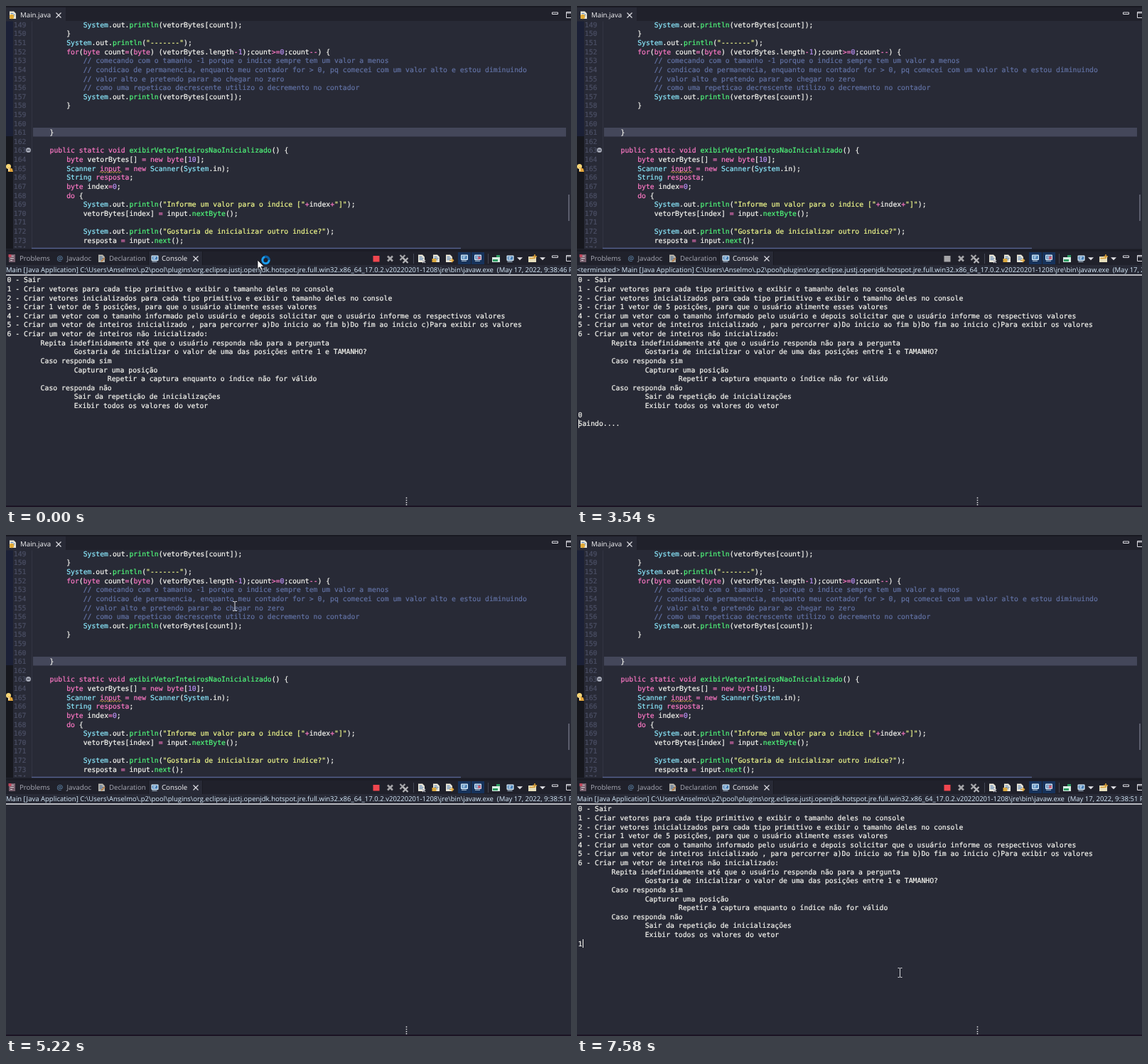
An HTML page that plays this animation: 795x704 px, repeating every 8 s.

```html
<!DOCTYPE html>
<html lang="pt">
<head>
<meta charset="utf-8">
<title>Console</title>
<style>
html, body { margin: 0; width: 100%; height: 100%; overflow: hidden; background: #282a36; }
svg { display: block; }
text { white-space: pre; text-rendering: geometricPrecision; }
.mono { --ink: #f8f8f2; font: 9.79px "DejaVu Sans Mono", monospace; }
.mono text, .mono tspan { fill: var(--ink); stroke: var(--ink); stroke-width: .2px; }
.ui { font: 9.7px "Open Sans", sans-serif; fill: #a9abb6; }
.path { font-size: 9.52px; fill: #d6eafa; }
</style>
</head>
<body>
<svg id="stage" width="795" height="704" viewBox="0 0 795 704">
  <defs>
    <clipPath id="editClip"><rect y="21.5" width="795" height="318"/></clipPath>
    <clipPath id="consClip"><rect y="379" width="795" height="323"/></clipPath>
    <g id="monitor">
      <rect x="-5" y="-4.5" width="10" height="7.5" rx="1" fill="#d8ecfa"/>
      <rect x="-3.7" y="-3.2" width="7.4" height="4.8" fill="#3f78b0"/>
      <path d="M-2.5-1.8h4M-2.5 0h3" stroke="#e8f4ff"/>
      <path d="M-4 4.3h7" stroke="#9fb4c8" stroke-width="1.3"/>
    </g>
    <g id="doc">
      <path d="M-5-5.500h6l3 3V5h-9z" fill="#e9e6d8"/>
      <path d="M-3.500-2.500h4M-3.500-.5h6M-3.500 1.500h5" stroke="#5580b5"/>
    </g>
    <path id="cross" d="M-3.500-3.500l7 7M3.500-3.500l-7 7"/>
    <path id="drop" d="M-4-1.800h8L0 2.200z" fill="#e4e4e8"/>
    <g id="winBtns" fill="none" stroke="#dcdce2">
      <path d="M768.500 9h8v2.500h-8z"/>
      <path d="M788.500 8.500h9v8h-9zM788.500 10h9"/>
    </g>
    <g id="arrow">
      <path d="M0 0V12.500L2.900 9.800L5 14.400L7.100 13.400L5.100 9.100H9z" fill="#fff" stroke="#15161c" stroke-width=".8"/>
    </g>
    <g id="busy">
      <use href="#arrow"/>
      <circle cx="11.500" r="4.700" fill="none" stroke="#0b62a8" stroke-width="3.400"/>
      <circle cx="11.500" r="4.700" fill="none" stroke="#1fa0ee" stroke-width="2.400" stroke-dasharray="20 9.500"/>
    </g>
    <path id="beam" d="M-3-6.500h2.300L0-5.800L.7-6.500H3M-3 6.500h2.300L0 5.800L.7 6.500H3M0-6V6" fill="none" stroke="#d5d5da"/>
  </defs>

  <rect width="795" height="704" fill="#282a36"/>

  <!-- editor -->
  <rect y="21" width="10" height="162" fill="#1b2036"/>
  <rect y="183" width="10" height="158" fill="#16171d"/>
  <path d="M36.500 21V340" stroke="#323543"/>
  <rect x="38" y="171" width="750" height="12.500" fill="#44475a"/>
  <g id="code" class="mono" clip-path="url(#editClip)"></g>
  <path d="M132 234l1.500-1.500l2 2l2-2l2 2l2-2l2 2l2-2l2 2l2-2l2 2l2-2l2 2l2-2l2 2l2-2l1 1" fill="none" stroke="#e8b04c" stroke-width=".9"/>
  <circle cx="31.500" cy="202.500" r="3.500" fill="#a4a8b5"/>
  <path d="M29.500 202.500h4" stroke="#343746"/>
  <circle cx="3.500" cy="225.500" r="3.500" fill="#f5d577"/>
  <path d="M3 227l6 1.500l1 4.500H3z" fill="#e3a53a"/>
  <path d="M4 228v4" stroke="#fff3c8" stroke-width="1.500"/>
  <path d="M792 265V302" stroke="#777b8c" stroke-width="1.300"/>
  <path d="M36 340.500H640" stroke="#56618f" stroke-width="1.300"/>
  <rect id="thumb" x="36" y="331" width="604" height="10" fill="#56618f"/>

  <!-- editor tab -->
  <rect width="795" height="21" fill="#20212b"/>
  <rect width="84" height="21.500" fill="#282a36"/>
  <rect width="795" height="2" fill="#191a22"/>
  <use href="#doc" x="10" y="13"/>
  <circle cx="8" cy="15" r="3.200" fill="#e2aa35"/>
  <text class="ui" x="20" y="16.300" style="fill:#f2f2f4">Main.java</text>
  <use href="#cross" x="74" y="13" stroke="#dedee4" stroke-width="1.200"/>
  <use href="#winBtns"/>

  <!-- view tabs -->
  <rect y="341.500" width="795" height="4" fill="#1b1c25"/>
  <rect y="345" width="795" height="19" fill="#20212b"/>
  <rect x="200" y="345" width="77" height="19" fill="#282a36"/>
  <path d="M200.500 345v19M276.500 345v19" stroke="#191a22"/>
  <rect x="4" y="349" width="9" height="11" fill="#77606e"/>
  <path d="M6 351.500h5M6 354.500h5M6 357.500h3" stroke="#d4c7ce"/>
  <rect x="3.500" y="349" width="4" height="4" fill="#c2475c"/>
  <text class="ui" x="19" y="358.400">Problems</text>
  <text class="ui" x="71.500" y="358" style="fill:#6d9cc6">@</text>
  <text class="ui" x="85.500" y="358.400">Javadoc</text>
  <use href="#doc" x="135" y="355" opacity=".75"/>
  <path d="M134 359l5-5" stroke="#b9814b" stroke-width="2"/>
  <text class="ui" x="145" y="358.400">Declaration</text>
  <use href="#monitor" x="209.500" y="355"/>
  <text class="ui" x="219" y="358.400" style="fill:#f6f6f8">Console</text>
  <use href="#cross" x="267" y="355" stroke="#dedee4" stroke-width="1.200"/>

  <!-- toolbar -->
  <rect id="stop" x="516.500" y="351" width="9" height="8.500"/>
  <use href="#cross" x="540.500" y="355" stroke="#a5a5a8" stroke-width="2.600"/>
  <use href="#cross" x="558" y="353.500" stroke="#a5a5a8" stroke-width="2.200"/>
  <use href="#cross" x="562" y="357.500" stroke="#b5b5b8" stroke-width="2.200"/>
  <path d="M573.500 348v14M678.500 348v14" stroke="#444754"/>
  <use href="#doc" x="585" y="355"/>
  <path d="M586 357l4 4m0-4l-4 4" stroke="#b9b9c0" stroke-width="1.300"/>
  <use href="#doc" x="606" y="355"/>
  <rect x="599.500" y="355" width="6" height="5" fill="#dda93d"/>
  <use href="#doc" x="624" y="355"/>
  <path d="M624 357.500h5m-2-2.500l2.500 2.500l-2.500 2.500" fill="none" stroke="#e0a63c" stroke-width="1.500"/>
  <path d="M636 346h18v17h-18zM655 346h18v17h-18z" fill="#17335c"/>
  <use href="#monitor" x="645" y="354"/>
  <use href="#monitor" x="664" y="354"/>
  <path d="M664 352l4 4m0-4l-4 4" stroke="#e14d5b" stroke-width="1.300"/>
  <path d="M684 353h6v-2h5v9h-11z" fill="#d9eee4"/>
  <path d="M685 356h7v3h-7zM690 350h5v3h-5z" fill="#2f9c63"/>
  <use href="#monitor" x="709.500" y="355"/>
  <use href="#drop" x="723" y="355"/>
  <rect x="735" y="352" width="11" height="8" fill="#e6dfbd"/>
  <path d="M736.500 354.500h7M744 349v6M741 352h6" stroke="#d99d34" stroke-width="1.600"/>
  <use href="#drop" x="755" y="355"/>
  <use href="#winBtns" y="342"/>

  <!-- console -->
  <text id="title" class="ui path" x="0" y="374.200"></text>
  <path d="M0 378H795" stroke="#e9e9ec" stroke-width="1.500"/>
  <g id="out" class="mono" clip-path="url(#consClip)"></g>
  <rect id="caret" width="1" height="12" fill="#f8f8f2"/>
  <rect y="702" width="795" height="2" fill="#1b1324"/>
  <path d="M563.500 690.500v12" stroke="#e4e4e8" stroke-width="1.500" stroke-dasharray="1.500 1.700"/>
  <text id="status" class="ui" x="567" y="699.600" style="fill:#c5c6cd">Launching Main: (0%)</text>
  <use id="mouse"/>
</svg>
<script>
const $ = id => document.getElementById(id);
const NS = 'http://www.w3.org/2000/svg';

function add(parent, tag, attrs, text) {
  const el = document.createElementNS(NS, tag);
  for (const k in attrs) el.setAttribute(k, attrs[k]);
  if (text) el.textContent = text;
  parent.append(el);
  return el;
}

// ---- editor ----
const source = `            System.out.println(vetorBytes[count]);
        }
        System.out.println("-------");
        for(byte count=(byte) (vetorBytes.length-1);count>=0;count--) {
            // comecando com o tamanho -1 porque o indice sempre tem um valor a menos
            // condicao de permanencia, enquanto meu contador for > 0, pq comecei com um valor alto e estou diminuindo
            // valor alto e pretendo parar ao chegar no zero
            // como uma repeticao decrescente utilizo o decremento no contador
            System.out.println(vetorBytes[count]);
        }


    }

    public static void exibirVetorInteirosNaoInicializado() {
        byte vetorBytes[] = new byte[10];
        Scanner input = new Scanner(System.in);
        String resposta;
        byte index=0;
        do {
            System.out.println("Informe um valor para o indice ["+index+"]");
            vetorBytes[index] = input.nextByte();

            System.out.println("Gostaria de inicializar outro indice?");
            resposta = input.next();
`.split('\n');

const rules = [
  [/^\/\/.*/, '#6272a4'],
  [/^"[^"]*"/, '#f1fa8c'],
  [/^(public|static|void|new|for|do|byte)\b/, '#ff79c6'],
  [/^(System|Scanner|String)\b/, '#8be9fd'],
  [/^(input(?= = new)|resposta(?=;))/, '#ff79c6'],
  [/^\w+(?=\()/, '#50fa7b'],
  [/^\d+\b/, '#bd93f9'],
  [/^[-=+>]+/, '#ff79c6'],
  [/^(\w+|\s+|.)/, '#f8f8f2']
];

source.forEach((line, i) => {
  const y = 29.8 + i * 12.62;
  add($('code'), 'text', { x: 28.500, y, 'text-anchor': 'end', style: '--ink:#4c5066' }, String(149 + i));
  const row = add($('code'), 'text', { x: 38, y });
  while (line) {
    const [re, ink] = rules.find(r => r[0].test(line));
    const word = line.match(re)[0];
    add(row, 'tspan', { style: '--ink:' + ink }, word);
    line = line.slice(word.length);
  }
});

// ---- console contents ----
const tab = n => ' '.repeat(8 * n);
const menu = [
  '0 - Sair',
  '1 - Criar vetores para cada tipo primitivo e exibir o tamanho deles no console',
  '2 - Criar vetores inicializados para cada tipo primitivo e exibir o tamanho deles no console',
  '3 - Criar 1 vetor de 5 posições, para que o usuário alimente esses valores',
  '4 - Criar um vetor com o tamanho informado pelo usuário e depois solicitar que o usuário informe os respectivos valores',
  '5 - Criar um vetor de inteiros inicializado , para percorrer a)Do inicio ao fim b)Do fim ao inicio c)Para exibir os valores',
  '6 - Criar um vetor de inteiros não inicializado:',
  tab(1) + 'Repita indefinidamente até que o usuário responda não para a pergunta',
  tab(2) + 'Gostaria de inicializar o valor de uma das posições entre 1 e TAMANHO?',
  tab(1) + 'Caso responda sim',
  tab(2) + 'Capturar uma posição',
  tab(3) + 'Repetir a captura enquanto o índice não for válido',
  tab(1) + 'Caso responda não',
  tab(2) + 'Sair da repetição de inicializações',
  tab(2) + 'Exibir todos os valores do vetor'
];
const values = [0, 57, 0, 76, 0, 0, 0, 100]
  .map((v, i) => `O valor no vetor na posicao ${i + 2} é ${v}`);

const app = 'Main [Java Application] C:\\Users\\Anselmo\\.p2\\pool\\plugins\\org.eclipse.justj.openjdk.hotspot.jre.full.win32.x86_64_17.0.2.v20220201-1208\\jre\\bin\\javaw.exe  (May 17, 2022, ';
const first = app + '9:38:46 PM)', older = app + '9:35:42 PM)', second = app + '9:38:51 PM)';

// time, title, lines, baseline of the first line
const screens = [
  [0, first, menu, 388.3],
  [1980, first, [...menu, '0'], 388.3],
  [2410, '<terminated> ' + first, [...menu, '0', 'Saindo....'], 388.3],
  [5080, older, [...values, ...menu], 386.2],
  [5220, second, [], 388.3],
  [5370, second, menu, 388.3],
  [7580, second, [...menu, '1'], 388.3]
];
const pages = screens.map(([, , lines, top]) => {
  const g = add($('out'), 'g', {});
  lines.forEach((s, i) => add(g, 'text', { x: 1.500, y: top + i * 12.63 }, s));
  return g;
});

// ---- timing ----
// time, shape, x, y
const mouse = [
  [0, 'busy', 354, 357],
  [150, 'beam', 341, 462],
  [270, 'beam', 331, 562],
  [420, 'beam', 366, 586],
  [550, 'beam', 379, 593],
  [1980, ''],
  [2110, 'beam', 379, 593],
  [3260, 'arrow', 310, 350],
  [3410, 'beam', 304, 26],
  [3540, ''],
  [5220, 'beam', 322, 100],
  [5370, 'busy', 336, 338],
  [5520, 'beam', 396, 463],
  [5670, 'beam', 430, 560],
  [5800, 'beam', 450, 636],
  [5920, 'beam', 454.500, 615]
];
// time, x, y; no position means hidden
const caret = [
  [0], [550, 2, 568], [1140], [1680, 2, 568], [1980, 8, 568],
  [2410, 2, 581], [2960], [3540, 2, 581], [3990], [4390, 2, 581], [4950],
  [5080, 455, 566], [5220], [6070, 2, 568], [6630], [7030, 2, 568], [7580, 8, 568]
];

const LOOP = 8000;
const at = (steps, t) => steps.findLastIndex(s => s[0] <= t);
const show = (el, on) => el.setAttribute('visibility', on ? 'visible' : 'hidden');
const between = (t, a, b) => t >= a && t < b;

function draw(t) {
  const page = at(screens, t);
  pages.forEach((g, i) => g.setAttribute('display', i === page ? 'inline' : 'none'));
  $('title').textContent = screens[page][1];
  $('stop').setAttribute('fill', page === 2 ? '#a5a5a8' : '#f0464f');
  show($('status'), between(t, 5080, 5220));
  show($('thumb'), between(t, 5520, 5800));

  const [, shape, mx, my] = mouse[at(mouse, t)];
  show($('mouse'), shape);
  if (shape) {
    $('mouse').setAttribute('href', '#' + shape);
    $('mouse').setAttribute('transform', `translate(${mx} ${my})`);
  }

  const [, cx, cy] = caret[at(caret, t)];
  show($('caret'), cx);
  if (cx) {
    $('caret').setAttribute('x', cx);
    $('caret').setAttribute('y', cy);
  }
}

const start = performance.now();
function tick() {
  draw((performance.now() - start) % LOOP);
  requestAnimationFrame(tick);
}
tick();
</script>
</body>
</html>
```
